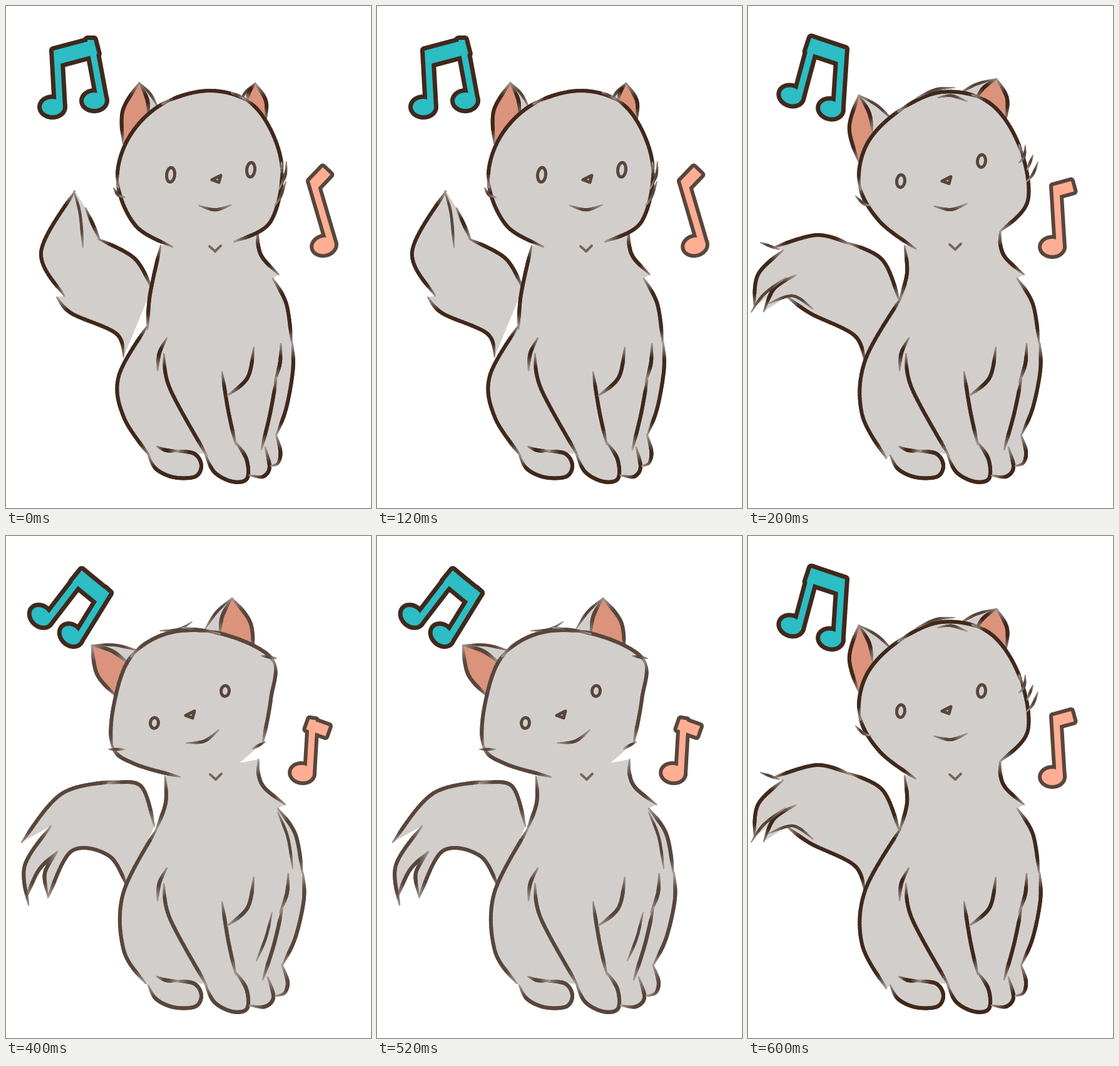
These frames come from a looping animation (583x800 px, 800 ms). An HTML page with a canvas:

```html
<!DOCTYPE html>
<html lang="en">
<head>
<meta charset="utf-8">
<title>Cat swaying to music</title>
<style>
html, body { margin: 0; width: 100%; height: 100%; overflow: hidden; background: #fff; }
canvas { display: block; }
</style>
</head>
<body>
<canvas id="stage" width="583" height="800"></canvas>
<script>
const ctx = document.getElementById('stage').getContext('2d');
const FUR = '#d2cecb', EAR = '#dc937b', TEAL = '#2dbdc4', PEACH = '#ffae93';
const DARK = [64, 41, 28], MID = [88, 70, 60], FADE = [165, 156, 150];
const STEPS = 16;

const points = text => text.split(' ').map(s => s.split(',').map(Number));
const rgb = c => `rgb(${c.map(Math.round)})`;
const along = (p, dir, n) => [p[0] + dir[0] * n, p[1] + dir[1] * n];

function unit(a, b) {
  const len = Math.hypot(b[0] - a[0], b[1] - a[1]);
  return [(b[0] - a[0]) / len, (b[1] - a[1]) / len];
}

// Catmull-Rom curve through a few key points.
function curve(keys) {
  const p = typeof keys === 'string' ? points(keys) : keys, out = [p[0]];
  for (let i = 0; i < p.length - 1; i++) {
    const a = p[i - 1] || p[i], b = p[i], c = p[i + 1], d = p[i + 2] || c;
    for (let k = 1; k <= STEPS; k++) {
      const t = k / STEPS;
      out.push([0, 1].map(n => b[n] + 0.5 * t * (c[n] - a[n] +
        t * (2 * a[n] - 5 * b[n] + 4 * c[n] - d[n] + t * (3 * (b[n] - c[n]) + d[n] - a[n])))));
    }
  }
  return out;
}

// Shallow arc from a to b, bulging by a share of its length.
function bow(a, b, bulge) {
  const mid = [(a[0] + b[0]) / 2 - (b[1] - a[1]) * bulge, (a[1] + b[1]) / 2 + (b[0] - a[0]) * bulge];
  return curve([a, mid, b]);
}

function trace(shape) {
  ctx.beginPath();
  shape.forEach(p => ctx.lineTo(...p));
  ctx.closePath();
}

function fill(color, ...lines) {
  trace(lines.flat());
  ctx.fillStyle = color;
  ctx.fill();
}

// Brush lines that thin and pale towards both ends.
function ink(width, tone, ...lines) {
  for (const p of lines) {
    const dist = [0];
    for (let i = 1; i < p.length; i++)
      dist.push(dist[i - 1] + Math.hypot(p[i][0] - p[i - 1][0], p[i][1] - p[i - 1][1]));
    const len = dist[dist.length - 1], fade = Math.min(24, len * 0.4);
    for (let i = 1; i < p.length; i++) {
      const mid = (dist[i] + dist[i - 1]) / 2;
      const e = Math.min(1, mid / fade, (len - mid) / fade);
      ctx.strokeStyle = rgb(tone.map((v, n) => FADE[n] + (v - FADE[n]) * e));
      ctx.lineWidth = width * (0.4 + 0.6 * e);
      ctx.beginPath();
      ctx.moveTo(...p[i - 1]);
      ctx.lineTo(...p[i]);
      ctx.stroke();
    }
  }
}

// Beam between two corners, plus a stem for each round head.
function note(text, color, tone, weight, depth) {
  const [a, b, ...heads] = points(text);
  const u = unit(a, b), down = [-u[1], u[0]], wide = 10;
  const parts = [[a, b, along(b, down, depth), along(a, down, depth)]];
  heads.forEach((h, i) => {
    const top = i ? b : a, s = unit(top, h), n = [s[1], -s[0]];
    const right = i ? b : along(a, n, wide), foot = along(h, n, 17);
    parts.push([right, foot, along(foot, n, -wide), along(right, n, -wide)]);
    parts.push(Array.from({ length: 32 }, (_, k) => {
      const t = k * Math.PI / 16;
      return along(along(h, n, 17 * Math.cos(t)), s, 13 * Math.sin(t));
    }));
  });
  ctx.strokeStyle = rgb(tone);
  ctx.lineWidth = weight * 2;
  for (const p of parts) { trace(p); ctx.stroke(); }
  for (const p of parts) fill(color, p);
}

function ear(text, side, tone) {
  const [base, tip, inner, back] = points(text);
  const outer = bow(base, tip, side * 0.14), front = bow(tip, inner, side * 0.09);
  const rear = bow(tip, back, side * 0.06);
  fill(FUR, rear, [inner]);
  fill(EAR, outer, front);
  ink(4.5, MID, rear);
  ink(6, tone, outer, front);
}

function face({ lean, eyes, nose, mouth, chin }) {
  ctx.strokeStyle = rgb(MID);
  ctx.lineWidth = 5;
  for (const [x, y] of points(eyes)) {
    ctx.beginPath();
    ctx.ellipse(x, y, 6.5, 10 - 1.5 * lean, 0.1, 0, 7);
    ctx.stroke();
  }
  const [n] = points(nose), [c] = points(chin);
  const near = (p, text) => points(text).map(d => along(p, d, 1));
  trace(near(n, '-8,1 6,-6 3,5'));
  ctx.stroke();
  ink(5, MID, bow(...points(mouth), 0.14), near(c, '-9,-8 0,0 9,-9'));
}

// Body lines shared by all poses, in order around the outline.
const RIM = [
  '227,716 240,738 268,751 302,750 312,732 300,713 266,709',
  '318,714 333,743 362,758 385,753 384,722 366,694',
  '389,748 412,750 424,735 416,703',
  '427,733 440,728 444,710 436,683',
  '437,683 455,640 467,580 466,537',
  '465,537 455,475 430,434',
  '441,428 412,402 403,380 403,356'
];
const LIMBS = [
  '257,529 245,553 242,581', '252,554 262,610 321,717', '345,583 355,645 367,699',
  '396,544 386,592 354,621', '445,538 443,570 433,600', '437,592 425,650 409,707',
  '241,702 256,708 276,709'
];
const HEAD_CUTS = [0, 1.9, 4, 5.6, 7, 9];

function cat(pose) {
  const { lean } = pose, tone = lean > 0 ? MID : DARK;
  const sway = line => curve(line).map(([x, y]) => [x + lean * Math.max(0, x - 400) * 0.13, y]);

  const tail = pose.tail.map(curve);
  fill(FUR, ...tail);
  ink(6, tone, ...tail);

  const body = [...pose.flank.map(curve), ...RIM.map(sway)];
  fill(FUR, ...body);
  ink(6, tone, ...body, ...LIMBS.map(sway));

  ear(pose.ears[0], -1, tone);
  ear(pose.ears[1], 1, tone);
  const head = curve(pose.head);
  fill(FUR, head, [[335, 394]]);
  ink(6, tone, ...HEAD_CUTS.slice(1).map((end, i) =>
    head.slice(Math.round(HEAD_CUTS[i] * STEPS), Math.round(end * STEPS) + 5)));
  ink(4.5, MID, ...pose.wisps.map(curve));
  face(pose);

  note(pose.pair, TEAL, DARK, 7, 23);
  note(pose.single, PEACH, MID, 6, 17);
}

const upright = {
  lean: -1,
  tail: ['188,559 176,522 105,490 81,464', '93,462 56,392 110,295', '127,322 150,373',
    '147,371 205,402 233,450'],
  flank: ['247,382 230,460 226,515', '226,509 180,590 188,655 230,718'],
  head: '266,384 207,350 178,280 196,210 250,156 330,135 400,163 440,250 423,343 364,376',
  ears: ['187,219 213,122 228,180 243,162', '415,184 398,123 385,151 372,154'],
  wisps: ['108,295 118,330 123,385', '172,290 179,301 190,305', '448,248 446,270 436,292',
    '447,280 438,305 429,318', '360,138 380,147'],
  eyes: '263,269 391,261', nose: '337,276', mouth: '308,318 360,317', chin: '334,391',
  pair: '76,71 140,54 74,161 141,151', single: '485,279 506,257 508,382'
};

const leaning = {
  lean: 0,
  tail: ['187,567 170,525 100,490 62,463', '25,487 42,450 76,429', '10,480 16,428 56,389',
    '40,385 110,365 165,380', '160,377 215,405 242,470'],
  flank: ['250,382 254,425 242,470', '245,464 187,565 182,650 221,721'],
  head: '268,387 210,343 178,285 190,220 240,168 310,137 385,154 433,222 447,310 402,360',
  ears: ['176,247 177,142 199,202 232,183', '412,182 397,116 362,151 335,141'],
  wisps: ['268,147 300,133 330,130', '303,146 325,143 350,152', '443,222 441,240 433,250',
    '455,238 446,261', '463,249 455,268 445,280', '172,303 185,315 196,318',
    '104,483 72,462 33,474', '20,377 50,388', '5,488 25,460 60,433'],
  eyes: '244,279 373,247', nose: '318,278', mouth: '297,319 350,315', chin: '331,388',
  pair: '101,51 155,69 69,143 132,164', single: '487,287 516,279 486,384'
};

const tilted = {
  lean: 1,
  tail: ['195,562 165,510 105,502 67,576', '67,574 62,537 82,503', '82,503 52,533 32,577',
    '36,588 30,525 72,462', '25,488 90,410 180,390', '163,394 215,398 237,462'],
  flank: ['254,383 255,425 239,470', '241,466 187,570 188,660 223,713'],
  head: '278,384 205,363 170,335 173,265 200,192 262,154 345,156 425,196 423,260 410,330',
  ears: ['178,257 137,174 196,203 212,183', '395,186 361,99 341,160 318,148'],
  wisps: ['246,151 275,149 297,137', '281,146 315,150 342,156', '164,340 189,340',
    '414,328 394,339', '408,191 432,195', '434,440 450,480 458,530', '425,600 415,640 400,677'],
  eyes: '237,298 350,247', nose: '295,285', mouth: '288,330 340,309', chin: '335,388',
  pair: '121,55 165,91 56,128 104,158', single: '485,292 516,303 473,378'
};

const poses = [upright, leaning, tilted, leaning];
ctx.lineCap = ctx.lineJoin = 'round';
const start = performance.now();
let shown = null;

function tick() {
  const pose = poses[Math.floor((performance.now() - start) / 200) % poses.length];
  if (pose !== shown) {
    ctx.clearRect(0, 0, 583, 800);
    cat(pose);
    shown = pose;
  }
  requestAnimationFrame(tick);
}
tick();
</script>
</body>
</html>
```
